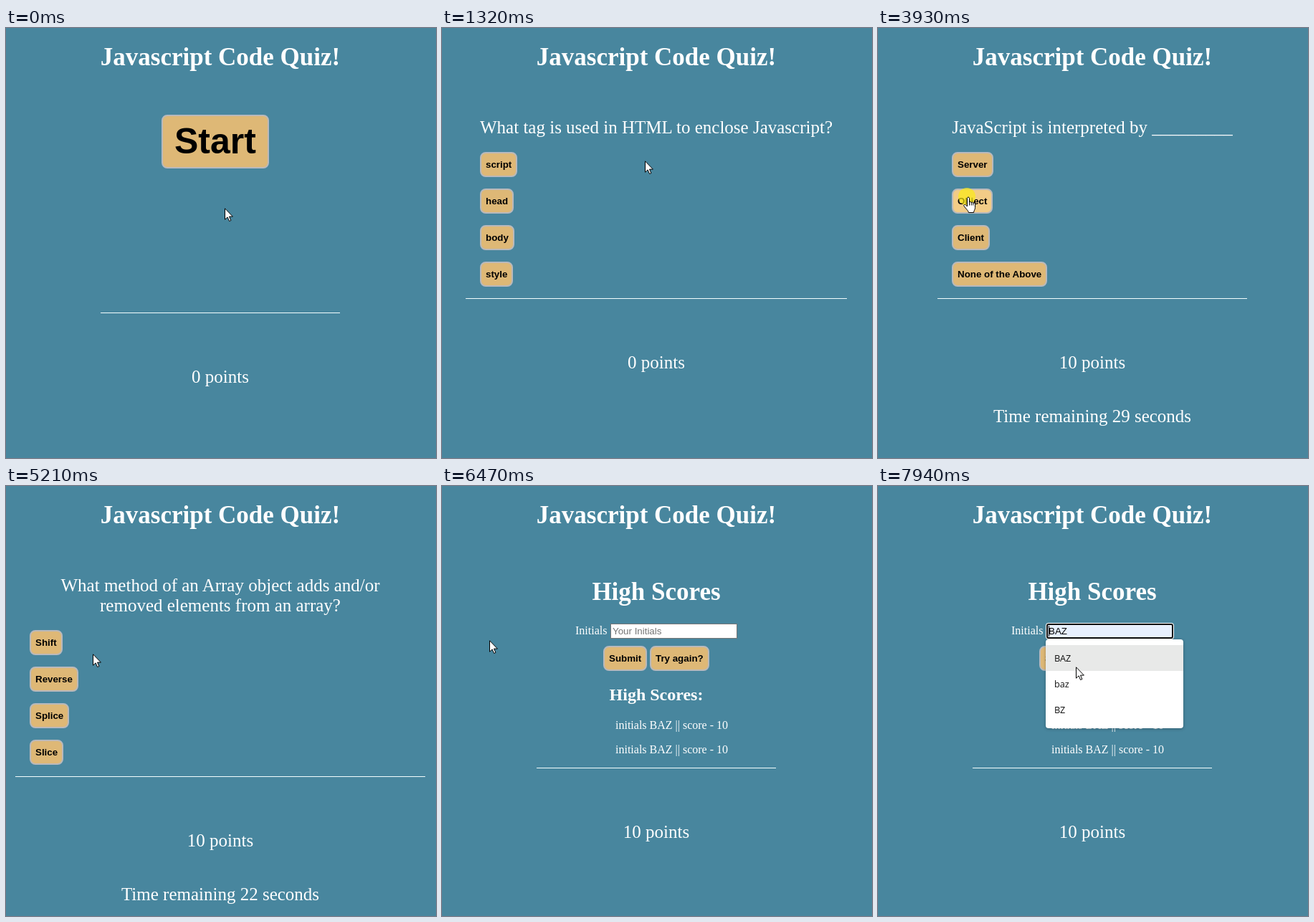
An HTML page that plays this animation: 600 by 600 pixels, repeating every 8000 ms.

```html
<!DOCTYPE html>
<html lang="en">
<head>
<meta charset="utf-8">
<title>Javascript Code Quiz</title>
<style>
html, body { margin: 0; width: 100%; height: 100%; overflow: hidden; background: #48869e; }
#stage { position: relative; width: 600px; height: 600px; overflow: hidden; isolation: isolate;
  background: #48869e; color: #fff; font: 25px/28px "Liberation Serif", "Times New Roman", serif; }
#stage * { position: absolute; box-sizing: border-box; white-space: pre; }
#stage .scene { left: 0; top: 0; width: 600px; height: 600px; }
.mid { left: 0; width: 598px; text-align: center; }
.h1 { font-size: 35px; line-height: 40px; font-weight: bold; }
.h2 { font-size: 24px; line-height: 27px; font-weight: bold; }
.small { font-size: 16px; line-height: 18px; }
.rule { height: 1px; background: #f4ffff; }
.btn { height: 35px; padding: 0 6px; border: 2px solid #b9b9bc; border-radius: 8px; background: #deb876; color: #000;
  font: bold 13.333px/31px "Liberation Sans", Arial, sans-serif; }
.btn.big { height: 75px; padding: 0 16px; font-size: 50px; line-height: 71px; }
.btn.hover { background: #f2cc87; }
#field { left: 235px; top: 192px; width: 177px; height: 21px; border: 1px solid #767676; background: #fff; color: #757575;
  font: 13.333px/15px "Liberation Sans", Arial, sans-serif; }
#field span { left: 2px; top: 2px; }
#field.hover { border-color: #4f4f4f; }
#field.focus { border: 2px solid #101010; border-radius: 3px; box-shadow: 0 0 0 1px #fff; }
#field.focus span { left: 1px; top: 1px; }
#field.focus::before { content: ""; position: absolute; left: 1px; top: 1px; width: 1px; height: 15px; background: #000; }
#field.filled { background: #e8f0fe; color: #000; }
#menu { left: 234px; top: 214px; width: 192px; height: 124px; border-radius: 4px; background: #fff; color: #111;
  box-shadow: 0 1px 4px rgba(0,0,0,.3); font: 12.7px/36px "Open Sans", "Noto Sans", sans-serif; }
#menu div { left: 0; width: 192px; height: 36px; padding-left: 12px; }
#menu .hover { background: #e8e9e8; }
#spot { width: 24px; height: 24px; margin: -12px 0 0 -12px; border-radius: 50%; background: rgba(252,236,16,.67); }
.cur { overflow: visible; width: 20px; height: 26px; fill: #fff; stroke: #000; }
#beam { mix-blend-mode: difference; stroke: #fff; fill: none; }
</style>
</head>
<body>
<div id="stage">
  <div class="mid h1" style="top:21px">Javascript Code Quiz!</div>
  <div id="score">
    <div class="rule"></div>
    <div class="mid" id="points"></div>
    <div class="mid" id="clock"></div>
  </div>
  <div id="scenes"></div>
  <div id="spot"></div>
  <svg class="cur" id="arrow"><path d="M.5 .8V16.2L4.1 12.9L6.6 18.5L8.9 17.5L6.5 12.1H11.4Z"/></svg>
  <svg class="cur" id="hand"><path d="M5.5 14V2.4C5.5 .6 8.5 .6 8.5 2.4V8.6C8.5 7 11.2 7 11.2 9C11.2 7.6 13.8 7.7 13.8 9.6C13.8 8.6 16.5 8.7 16.5 10.7V15.5C16.5 19 14.6 19.5 14.6 22.5H7.4C7.2 19.6 3.6 17.6 .9 13.2C0 11.4 2.6 10 5.5 14Z"/><path fill="none" d="M8.5 8V12.5M11.2 9V12.5M13.8 9.6V12.5"/></svg>
  <svg class="cur" id="beam"><path d="M0 .5H3M4 .5H7M3.5 1V15M0 15.5H3M4 15.5H7"/></svg>
</div>
<script>
const LOOP = 8000;
const $ = id => document.getElementById(id);

function add(parent, cls, text, left, top) {
  const el = document.createElement('div');
  el.className = cls;
  el.textContent = text;
  if (left != null) el.style.left = left + 'px';
  if (top != null) el.style.top = top + 'px';
  parent.append(el);
  return el;
}

const scenes = [];
function scene(start, ruleX, ruleY) {
  const el = add($('scenes'), 'scene', '');
  scenes.push({ el, start, ruleX, ruleY });
  return el;
}

function question(start, x, lines, answers) {
  const top = 145 + 28 * lines.length;
  const s = scene(start, x - 20, top + 204);
  lines.forEach((line, i) => add(s, 'mid', line, null, 125 + 28 * i));
  answers.forEach((a, i) => add(s, 'btn', a, x, top + 51 * i));
}

add(scene(0, 132, 397), 'btn big', 'Start', 217, 121);
question(1320, 53, ['What tag is used in HTML to enclose Javascript?'],
  ['script', 'head', 'body', 'style']);
question(2670, 103, ['JavaScript is interpreted by _________'],
  ['Server', 'Object', 'Client', 'None of the Above']);
question(4330, 33, ['What method of an Array object adds and/or', 'removed elements from an array?'],
  ['Shift', 'Reverse', 'Splice', 'Slice']);

const high = scene(6080, 132, 393);
add(high, 'mid h1', 'High Scores', null, 128);
add(high, 'small', 'Initials', 186, 193);
const field = add(high, '', '');
field.id = 'field';
const entry = document.createElement('span');
field.append(entry);
add(high, 'btn', 'Submit', 225, 223);
add(high, 'btn', 'Try again?', 290, 223);
add(high, 'mid h2', 'High Scores:', null, 278);
for (const y of [325, 359]) add(high, 'small', 'initials BAZ || score - 10', 242, y);
const menu = add(high, '', '');
menu.id = 'menu';
const items = ['BAZ', 'baz', 'BZ'].map((t, i) => add(menu, '', t, 0, 8 + 36 * i));

// Pointer moves: first step, last step, step count, end point
const moves = [
  [260, 920, 10, 283, 185], [1590, 2330, 10, 78, 192], [2940, 2940, 1, 79, 192],
  [3140, 3530, 7, 124, 235], [5210, 5740, 9, 51, 216], [6340, 7080, 12, 258, 200],
  [7150, 7280, 3, 263, 197], [7810, 7940, 3, 276, 252]
];
const clicks = [[1130, 1320], [2530, 2670], [3930, 4330], [5810, 6080], [7480, 7610]];

function pointer(t) {
  let x = 305, y = 251;
  for (const [from, to, n, ex, ey] of moves) {
    if (t < from) break;
    const k = t >= to ? 1 : (Math.floor((t - from) / (to - from) * (n - 1)) + 1) / n;
    const e = k * k * (3 - 2 * k);
    x += (ex - x) * e;
    y += (ey - y) * e;
  }
  return [Math.round(x), Math.round(y)];
}

const inside = (x, y, l, t, w, h) => x >= l && x < l + w && y >= t && y < t + h;
const over = (el, x, y) => inside(x, y, el.offsetLeft, el.offsetTop, el.offsetWidth, el.offsetHeight);
const show = (el, on) => { el.style.display = on ? '' : 'none'; };
function place(el, x, y) {
  el.style.left = x + 'px';
  el.style.top = y + 'px';
}

const rule = document.querySelector('.rule');

function draw(t) {
  const now = scenes.filter(s => t >= s.start).pop();
  for (const s of scenes) show(s.el, s === now);
  place(rule, now.ruleX, now.ruleY);
  rule.style.width = 598 - 2 * now.ruleX + 'px';
  $('points').textContent = (t < 2670 ? 0 : 10) + ' points';
  $('points').style.top = now.ruleY + 76 + 'px';
  $('clock').textContent = `Time remaining ${t < 3330 ? 30 : t < 4330 ? 29 : 22} seconds`;
  $('clock').style.top = now.ruleY + 151 + 'px';
  show($('clock'), t >= 2330 && t < 6080);

  const [x, y] = pointer(t);
  const focus = t >= 7480, open = t >= 7610;
  let hand = false, beam = false;
  for (const b of now.el.querySelectorAll('.btn')) {
    const hit = !open && over(b, x, y);
    b.classList.toggle('hover', hit);
    hand = hand || hit;
  }
  if (now.el === high) {
    const onField = over(field, x, y);
    const picked = open && inside(x, y, 234, 222, 192, 36);
    beam = onField || inside(x, y, 186, 193, 45, 18);
    field.classList.toggle('hover', onField);
    field.classList.toggle('focus', focus);
    field.classList.toggle('filled', picked);
    entry.textContent = picked ? 'BAZ' : 'Your Initials';
    items[0].classList.toggle('hover', picked);
    show(menu, open);
  }

  show($('spot'), clicks.some(([a, b]) => t >= a && t < b));
  place($('spot'), x, y);
  show($('arrow'), !hand && !beam);
  show($('hand'), hand);
  show($('beam'), beam);
  place($('arrow'), x, y);
  place($('hand'), x - 5, y);
  place($('beam'), x - 3, y - 7);
}

const begin = performance.now();
function tick() {
  draw((performance.now() - begin) % LOOP);
  requestAnimationFrame(tick);
}
tick();
</script>
</body>
</html>
```
